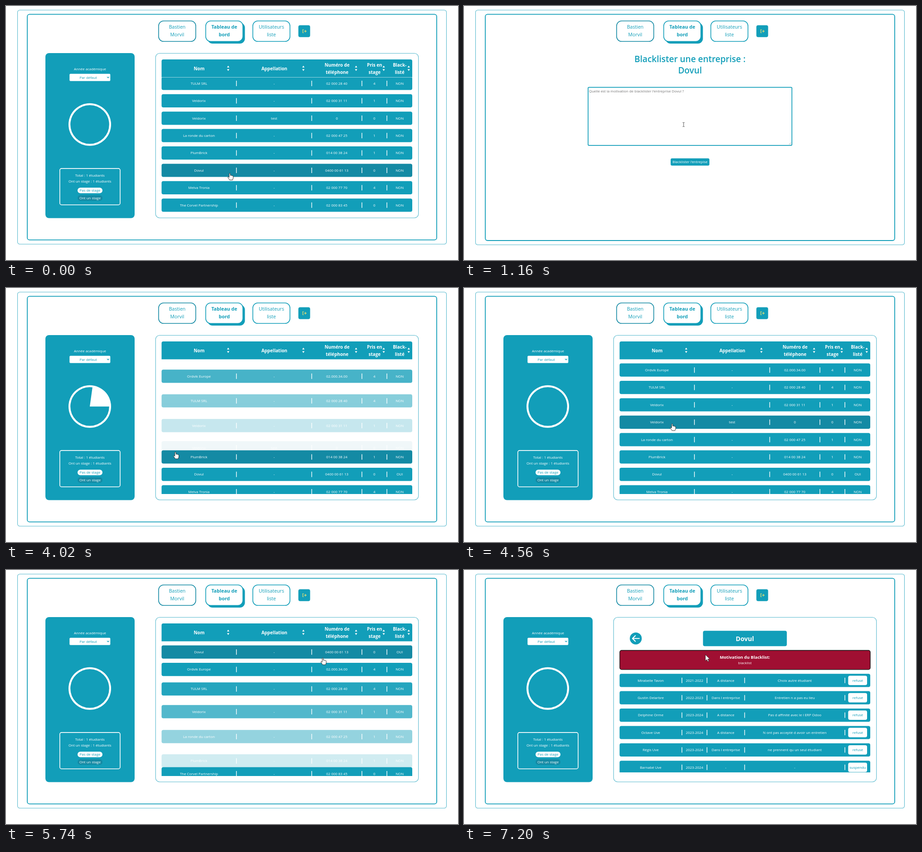
These frames come from a looping animation (998 by 561 pixels, 7220 ms). An HTML page:

```html
<!DOCTYPE html>
<html lang="fr">
<head>
<meta charset="utf-8">
<title>Tableau de bord</title>
<style>
  html, body { margin: 0; width: 100%; height: 100%; overflow: hidden; background: #fff; }
  svg { display: block; width: 998px; height: 561px; font: 7.9px "Open Sans", "Noto Sans", sans-serif; }
  text { text-anchor: middle; white-space: pre; }
</style>
</head>
<body>
<svg id="stage" viewBox="0 0 998 561">
  <defs>
    <clipPath id="listClip"><rect x="340" y="157.5" width="560" height="297.5"/></clipPath>
    <clipPath id="panelClip"><rect x="331" y="105" width="579.5" height="342"/></clipPath>
  </defs>
</svg>
<script>
const LOOP = 7220;
const TEAL = '#129eb9', DARK = '#148aa4', PALE = '#55b8cd', WHITE = '#fff';
const ROW = { x: 343.5, w: 553.5, h: 29.2, pitch: 38.4 };
const COMPANY = 'Dovul';
const stage = document.getElementById('stage');

function add(parent, tag, attrs = {}, content) {
  const el = document.createElementNS('http://www.w3.org/2000/svg', tag);
  for (const key in attrs) el.setAttribute(key, attrs[key]);
  if (content !== undefined) el.textContent = content;
  parent.appendChild(el);
  return el;
}
const group = (parent, attrs) => add(parent, 'g', attrs);
const box = (parent, x1, y1, x2, y2, rx, attrs) =>
  add(parent, 'rect', { x: x1, y: y1, width: x2 - x1, height: y2 - y1, rx, ...attrs });
const outline = (stroke, width, fill = 'none') => ({ fill, stroke, 'stroke-width': width });

// Text centred vertically on y
function label(parent, x, y, content, fill = WHITE, size = 7.9, weight = 400, attrs = {}) {
  return add(parent, 'text',
    { x, y: y + size * .35, fill, 'font-size': size, 'font-weight': weight, ...attrs }, content);
}
function separators(parent, xs, y) {
  for (const x of xs) box(parent, x - .7, y - 6, x + .7, y + 6, 0, { fill: WHITE });
}
const show = (el, visible) => { el.style.display = visible ? '' : 'none'; };
const clamp = v => Math.min(1, Math.max(0, v));

function bezier(x1, y1, x2, y2) {
  const at = (a, b, s) => 3 * a * s * (1 - s) ** 2 + 3 * b * s * s * (1 - s) + s ** 3;
  return p => {
    if (p <= 0 || p >= 1) return clamp(p);
    let lo = 0, hi = 1;
    for (let i = 0; i < 20; i++) {
      const mid = (lo + hi) / 2;
      if (at(x1, x2, mid) < p) lo = mid; else hi = mid;
    }
    return at(y1, y2, lo);
  };
}
const easeInOut = bezier(.42, 0, .58, 1);
const ease = bezier(.25, .1, .25, 1);

// Page frame and navigation
const outer = box(stage, 25.5, 9, 972.5, 526, 5, outline(PALE, 1.1));
const inner = box(stage, 47, 18.3, 951, 516.7, 5, outline(TEAL, 1.8));

function navButton(x, lines, stroke, active) {
  if (active) box(stage, x + 4.5, 37, x + 87, 83, 11, { fill: TEAL });
  box(stage, x + .5, 33, x + 82.5, 78.3, 11, outline(stroke, 1.6, WHITE));
  lines.forEach((line, i) =>
    label(stage, x + 41.5, 46.5 + 17 * i, line, TEAL, 10.6, active ? 700 : 400));
}
navButton(336.5, ['Bastien', 'Morvil'], DARK);
navButton(440.5, ['Tableau de', 'bord'], TEAL, true);
navButton(544.5, ['Utilisateurs', 'liste'], TEAL);
box(stage, 645.5, 42.5, 671.5, 68.8, 4, { fill: TEAL });
add(stage, 'path', { d: 'M657.5 52.3H655.2V59H657.5M657.5 55.7H662.5M660.3 53.2L662.8 55.7 660.3 58.2', ...outline('#f1e36f', 1.1) });

// Dashboard shell
const dashboard = group(stage);
box(dashboard, 87, 104, 284, 468.5, 8, { fill: TEAL });
label(dashboard, 185.5, 139.5, 'Année académique');
box(dashboard, 140.3, 149.8, 230.3, 165.8, 2, { fill: WHITE });
label(dashboard, 181.7, 158, 'Par défaut', TEAL);
add(dashboard, 'path', { d: 'M223.2 156.4L225.4 158.7 227.6 156.4', ...outline(TEAL, 1.3) });
add(dashboard, 'circle', { cx: 185, cy: 261.8, r: 47, fill: WHITE });
const slice = add(dashboard, 'circle',
  { cx: 185, cy: 261.8, r: 21.4, pathLength: 360, ...outline(TEAL, 42.8) });
box(dashboard, 118.8, 358.9, 252, 439.2, 4, outline(WHITE, 1.6));
label(dashboard, 185.3, 374.3, 'Total : 1 étudiants');
label(dashboard, 185.3, 386.8, 'Ont un stage : 1 étudiants');
box(dashboard, 158, 401.3, 213, 413.6, 6.1, { fill: WHITE });
label(dashboard, 185.5, 407.6, 'Pas de stage', TEAL);
box(dashboard, 158, 418, 213, 430.3, 6.1, { fill: DARK });
label(dashboard, 185.5, 424.3, 'Ont un stage');
box(dashboard, 330.3, 104.5, 910.7, 468, 9, outline(PALE, 1.1));

// Company list
const LIST_X = [426, 592, 730.5, 813.3, 869.2];
const companies = [
  ['Ordvik Europe', '-', '02.000.34.00', 4],
  ['TULM SRL', '-', '02 000 28 40', 4],
  ['Veldorix', '-', '02 000 31 11', 1],
  ['Veldorix', 'test', '0', 0],
  ['La ronde du carton', '-', '02 000 47 25', 1],
  ['PlumBrick', '-', '014 00 38 24', 1],
  [COMPANY, '-', '0400 00 61 13', 0],
  ['Melva Tronia', '-', '02 000 77 70', 4],
  ['The Corvel Partnership', '-', '02 000 83 45', 0]
];
const list = group(dashboard);
const listBody = group(group(list, { 'clip-path': 'url(#listClip)' }));

function rowGroup(parent, y) {
  const el = group(parent);
  const back = box(el, ROW.x, y - ROW.h / 2, ROW.x + ROW.w, y + ROW.h / 2, 4, { fill: TEAL });
  return { el, back };
}
function companyRows(order, blacklisted) {
  const holder = group(listBody);
  const rows = order.map((id, slot) => {
    const y = 181.2 + slot * ROW.pitch;
    const row = rowGroup(holder, y);
    const flag = blacklisted && companies[id][0] === COMPANY ? 'OUI' : 'NON';
    [...companies[id], flag].forEach((cell, i) => label(row.el, LIST_X[i], y, cell));
    separators(row.el, [508.7, 675, 785.8, 841], y);
    return row;
  });
  return { holder, rows };
}
const byName = companies.map((_, i) => i);
const lists = [
  { from: 0, to: 20, start: -1e4, scroll: 48.6, ...companyRows(byName, false) },
  { from: 3820, to: 5400, start: 3820, scroll: 0, ...companyRows(byName, true) },
  { from: 5400, to: 6640, start: 5400, scroll: 0, ...companyRows([6, 0, 1, 2, 4, 5, 7, 8, 3], true) }
];

add(list, 'path', { d: 'M343.5 157.5V122Q343.5 118 347.5 118H893Q897 118 897 122V157.5Z', fill: TEAL });
const edge = box(list, 343.5, 157, 897, 157.8, 0, { fill: '#a9dbe6' });
[['Nom'], ['Appellation'], ['Numéro de', 'téléphone'], ['Pris en', 'stage'], ['Black-', 'listé']]
  .forEach((lines, i) => {
    const x = LIST_X[i] + (i < 4 ? .5 : 0);
    const top = 138.3 - (lines.length - 1) * 7.8;
    lines.forEach((line, n) => label(list, x, top + n * 15.6, line, WHITE, 9.9, 700));
    const ax = [490.6, 656.6, 773, 834, 889.2][i];
    add(list, 'path', { d: `M${ax - 2.6} 135.8h5.2l-2.6-4zM${ax - 2.6} 139.4h5.2l-2.6 4z`, fill: WHITE });
  });

// Company details
const details = group(dashboard, { 'clip-path': 'url(#panelClip)' });
const heading = group(details);
add(heading, 'circle', { cx: 379.3, cy: 151.2, r: 13.2, fill: TEAL });
add(heading, 'path', { d: 'M387 151.2H372.5M378.3 145L372 151.2 378.3 157.4',
  ...outline(WHITE, 2.1), 'stroke-linecap': 'round', 'stroke-linejoin': 'round' });
box(heading, 527.7, 134.2, 712.8, 168.2, 4, { fill: TEAL });
label(heading, 620.2, 151.8, COMPANY, WHITE, 14, 700);

const notice = group(details);
box(notice, 344, 177.5, 897, 219.8, 4, outline('#111', 1.3, '#a00f32'));
label(notice, 620.2, 193, 'Motivation du Blacklist:', WHITE, 9.4, 700);
label(notice, 620.2, 205, 'blacklist');

const contacts = group(details);
[
  ['Mirabelle Tavon', '2021-2022', 'A distance', 'Choix autre étudiant', 'refusé'],
  ['Gustin Delarbre', '2022-2023', 'Dans l entreprise', 'Entretien n a pas eu lieu', 'refusé'],
  ['Delphine Orme', '2023-2024', 'A distance', 'Pas d affinité avec le l ERP Odoo', 'refusé'],
  ['Octave Uve', '2023-2024', 'A distance', 'N ont pas accepté d avoir un entretien', 'refusé'],
  ['Régis Uve', '2023-2024', 'Dans l entreprise', 'ne prennent qu un seul étudiant', 'refusé'],
  ['Barnabé Uve', '2023-2024', '-', '-', 'suspendu']
].forEach((cells, i) => {
  const y = 243.8 + i * ROW.pitch;
  const { el } = rowGroup(contacts, y);
  box(el, 848.3, y - 10.4, 890, y + 10.4, 4, { fill: WHITE });
  cells.forEach((cell, n) =>
    label(el, [412.2, 509, 578, 730.3, 869.4][n], y, cell, n === 4 ? TEAL : WHITE));
  separators(el, [481.2, 536.5, 619.6, 841], y);
});

// Blacklist form
const form = group(stage);
label(form, 499, 117.5, 'Blacklister une entreprise :', TEAL, 19, 600);
label(form, 499, 142.5, COMPANY, TEAL, 19, 600);
box(form, 274, 179.6, 724, 307.8, 2, outline(TEAL, 1.7, WHITE));
add(form, 'path', { d: 'M717.5 306L722 301.5M720.3 306L722 304.3', ...outline('#888', .7) });
const LEFT = { 'text-anchor': 'start', style: 'text-anchor:start' };
const placeholder = label(form, 276, 187.8,
  `Quelle est la motivation de blacklister l'entreprise ${COMPANY} ?`, '#757575', 7.9, 400, LEFT);
const typed = label(form, 276, 187.8, '', '#111', 7.9, 400, LEFT);
const caret = box(form, 0, 182.5, .8, 193, 0, { fill: '#111' });
const submit = box(form, 456.3, 336.6, 541.8, 352.4, 3, { fill: TEAL });
label(form, 499, 344.7, "Blacklister l'entrepise");

// Pointer
const pointers = {
  arrow: group(stage), hand: group(stage), beam: group(stage)
};
add(pointers.arrow, 'path', { d: 'M0 0V13.6L3.2 10.7 5.4 15.3 7.5 14.3 5.4 9.8H9.7Z', ...outline('#222', .8, WHITE) });
add(pointers.hand, 'path', {
  d: 'M-1.2 1Q0-.7 1.2 1V5.2Q2.5 4.3 3.5 5.5 4.8 4.8 5.8 6.1 7.6 5.7 7.7 7.5V11L6.2 15.2H-.2L-4.1 9.6Q-4.2 7.7-2.4 8.4L-1.2 9.5Z',
  ...outline('#222', .9, WHITE), 'stroke-linejoin': 'round' });
add(pointers.beam, 'path', { d: 'M-2.2-4.5H-.6L0-4 .6-4.5H2.2M0-4V4M-2.2 4.5H-.6L0 4 .6 4.5H2.2', ...outline('#444', .9) });

// time, x, y
const path = [
  [0, 494, 369], [120, 494, 369], [700, 560, 200], [780, 560, 200], [1160, 485, 262],
  [1400, 455, 243], [3220, 455, 243], [3600, 500, 343], [3800, 488, 347], [4020, 374, 362],
  [4140, 374, 360], [4560, 459, 300], [5240, 884, 138], [5400, 884, 138], [5480, 836, 199],
  [6160, 480, 186], [6240, 480, 181], [6640, 480, 181], [7200, 533, 187], [LOOP, 533, 187]
];
function pointerAt(t) {
  const i = Math.max(1, path.findIndex(p => p[0] > t));
  const [t0, x0, y0] = path[i - 1], [t1, x1, y1] = path[i];
  const p = (t - t0) / (t1 - t0);
  return [x0 + (x1 - x0) * p, y0 + (y1 - y0) * p];
}
const inside = (x, y, x1, y1, x2, y2) => x >= x1 && x <= x2 && y >= y1 && y <= y2;
const keyTimes = [2260, 2320, 2400, 2480, 2560, 2640, 2720, 2880, 3060];

function renderList(t, px, py) {
  let hovered = false;
  for (const table of lists) {
    const active = t >= table.from && t < table.to;
    show(table.holder, active);
    if (!active) continue;
    show(edge, table.scroll > 0);
    table.holder.setAttribute('transform', `translate(0 ${-table.scroll})`);
    table.rows.forEach(({ el, back }, i) => {
      const elapsed = t - table.start - i * 50;
      // rows stay visible until their own entrance begins
      const p = elapsed < 0 ? 1 : easeInOut(elapsed / 300);
      el.setAttribute('opacity', p);
      el.setAttribute('transform', `translate(0 ${60 * (1 - p)})`);
      const y = 181.2 + i * ROW.pitch - table.scroll + 60 * (1 - p);
      const over = py > 157.5 && inside(px, py, ROW.x, y - ROW.h / 2, ROW.x + ROW.w, y + ROW.h / 2);
      back.setAttribute('fill', over ? DARK : TEAL);
      hovered = hovered || over;
    });
  }
  return hovered || inside(px, py, ROW.x, 118, ROW.x + ROW.w, 157.5);
}

function renderDetails(t) {
  const start = t < 780 ? 20 : 6640;
  const slide = (el, delay) => {
    const p = ease((t - start - delay) / 480);
    el.setAttribute('transform', `translate(${ROW.w * (1 - p)} 0)`);
    show(el, t >= start + delay);
  };
  show(notice, start > 780);
  if (start > 780) slide(notice, 0);
  slide(contacts, 40);
  show(heading, t >= start + 40);
  heading.setAttribute('opacity', easeInOut((t - start - 20) / 300));
}

function renderForm(t, px, py) {
  const count = keyTimes.filter(k => t >= k).length;
  typed.textContent = 'blacklist'.slice(0, count);
  show(placeholder, count === 0);
  show(caret, (t >= 1660 && t < 1940) || t >= 2240);
  caret.setAttribute('x', 276 + (count ? typed.getComputedTextLength() : 0));
  const onButton = inside(px, py, 456, 336, 542, 353);
  submit.setAttribute('fill', onButton ? DARK : TEAL);
  if (onButton) return 'hand';
  return inside(px, py, 274, 179, 724, 308) ? 'beam' : 'arrow';
}

function render(t) {
  const onForm = t >= 780 && t < 3820;
  const onDetails = (t >= 20 && t < 780) || t >= 6640;
  const [px, py] = pointerAt(t);
  let kind = 'arrow';

  show(dashboard, !onForm);
  show(form, onForm);
  show(list, !onDetails);
  show(details, onDetails);
  outer.setAttribute('height', onForm ? 518.5 : 517);
  inner.setAttribute('height', onForm ? 499.7 : 498.4);

  if (onForm) kind = renderForm(t, px, py);
  else if (onDetails) renderDetails(t);
  else if (renderList(t, px, py)) kind = 'hand';

  const turn = t < 3820 ? 1 : easeInOut((t - 3820) / 300);
  slice.setAttribute('stroke-dasharray', turn < 1 ? `${360 * turn} 360` : 'none');

  for (const name in pointers) show(pointers[name], name === kind);
  pointers[kind].setAttribute('transform', `translate(${px} ${py})`);
}

const origin = performance.now();
function tick() {
  render((performance.now() - origin) % LOOP);
  requestAnimationFrame(tick);
}
tick();
</script>
</body>
</html>
```
